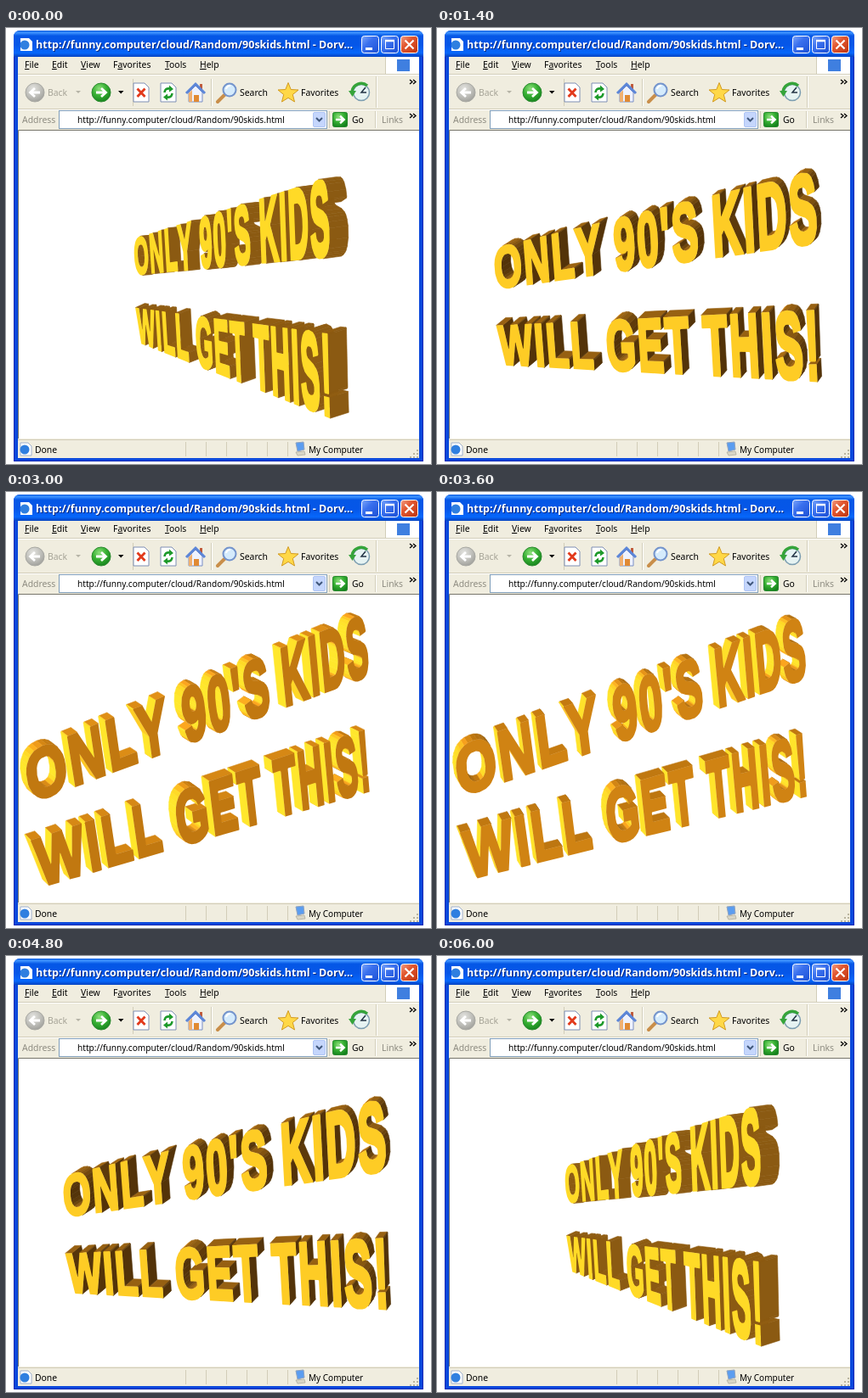
An HTML page that plays this animation: 500 px wide and 514 px high, repeating every 6200 ms.

```html
<!DOCTYPE html>
<html lang="en">
<head>
<meta charset="utf-8">
<title>Only 90's kids</title>
<style>
html, body { margin: 0; width: 100%; height: 100%; overflow: hidden; background: #fff; }
svg { display: block; width: 500px; height: 514px; }
text { font: 10.4px "Noto Sans", "Open Sans", sans-serif; fill: #000; white-space: pre; }
.u { text-decoration: underline; }
.dim { fill: #a5a396; }
.line { fill: none; stroke: #d2cdb8; }
</style>
</head>
<body>
<svg viewBox="0 0 500 514">
  <defs>
    <linearGradient id="bar" x2="0" y2="1">
      <stop offset="0" stop-color="#0a5be0"/><stop offset=".08" stop-color="#3c92ff"/>
      <stop offset=".2" stop-color="#0557e6"/><stop offset=".55" stop-color="#0556e8"/>
      <stop offset=".85" stop-color="#0667fb"/><stop offset="1" stop-color="#0342c0"/>
    </linearGradient>
    <linearGradient id="blue" x2="1" y2="1">
      <stop offset="0" stop-color="#7fa8fa"/><stop offset=".4" stop-color="#3a70ee"/><stop offset="1" stop-color="#1c50d4"/>
    </linearGradient>
    <linearGradient id="red" x2="1" y2="1">
      <stop offset="0" stop-color="#f4a088"/><stop offset=".4" stop-color="#e2572f"/><stop offset="1" stop-color="#bf3410"/>
    </linearGradient>
    <radialGradient id="green" cx=".4" cy=".3" r=".75">
      <stop offset="0" stop-color="#8ee07c"/><stop offset=".5" stop-color="#37b033"/><stop offset="1" stop-color="#14801c"/>
    </radialGradient>
    <radialGradient id="gray" cx=".4" cy=".3" r=".75">
      <stop offset="0" stop-color="#e4e4e0"/><stop offset=".6" stop-color="#bdbdb8"/><stop offset="1" stop-color="#9d9d98"/>
    </radialGradient>
    <path id="page" d="M-9-11H4L9-6V11H-9Z" fill="#fff" stroke="#7f8fb4"/>
    <path id="more" d="M0 0l3 2.5-3 2.5M4 0l3 2.5-3 2.5" fill="none" stroke="#000" stroke-width="1.3"/>
    <path id="arrow" d="M-6 0H5M0-5L5.5 0 0 5" fill="none" stroke="#fff" stroke-width="2.8"/>
  </defs>

  <!-- window frame -->
  <path d="M9 511V11Q9 3 17 3H483Q491 3 491 11V511Z" fill="#0a48dc"/>
  <path d="M9.5 510.5V34M490.5 34V510.5H9.5" fill="none" stroke="#0526b4"/>
  <path d="M9 34V11Q9 3 17 3H483Q491 3 491 11V34Z" fill="url(#bar)"/>
  <path d="M17 12H27L31 16V27H17Z" fill="#fff"/>
  <circle cx="22" cy="20" r="5.5" fill="#2f7fe0"/>
  <text x="36" y="25" style="font-size:12.5px;font-weight:700;fill:#0a2a80">http://funny.computer/cloud/Random/90skids.html - Dorv...</text>
  <text x="35" y="24" style="font-size:12.5px;font-weight:700;fill:#fff">http://funny.computer/cloud/Random/90skids.html - Dorv...</text>
  <g stroke="#fff">
    <rect x="418.5" y="9.5" width="20" height="20" rx="3" fill="url(#blue)"/>
    <rect x="441.5" y="9.5" width="20" height="20" rx="3" fill="url(#blue)"/>
    <rect x="464.5" y="9.5" width="20" height="20" rx="3" fill="url(#red)"/>
    <path d="M423 24.5H431" stroke-width="3"/>
    <path d="M446.5 15V24.5H456.5V15" fill="none"/>
    <path d="M446 15H457" stroke-width="2.5"/>
    <path d="M469.5 14.5L479.5 24.5M479.5 14.5L469.5 24.5" stroke-width="2.2"/>
  </g>

  <!-- menu, toolbar and address bar -->
  <rect x="14" y="34" width="472" height="473" fill="#f0eddf"/>
  <rect x="447" y="34" width="39" height="20" fill="#fff"/>
  <rect x="460" y="37" width="15" height="14" fill="#3f7fe0"/>
  <path class="line" d="M14 54.5H486M14 95.5H486M446.5 34V54M149.5 60V92M241.5 60V92M435.5 57V94M380.5 98V118M434.5 98V118"/>
  <path d="M14 55.5H486M14 96.5H486M242.5 60V92M436.5 57V94M435.5 98V118" fill="none" stroke="#fff"/>
  <text x="22" y="47"><tspan class="u">F</tspan>ile</text>
  <text x="54" y="47"><tspan class="u">E</tspan>dit</text>
  <text x="88" y="47"><tspan class="u">V</tspan>iew</text>
  <text x="126" y="47">F<tspan class="u">a</tspan>vorites</text>
  <text x="187" y="47"><tspan class="u">T</tspan>ools</text>
  <text x="228" y="47"><tspan class="u">H</tspan>elp</text>

  <circle cx="34" cy="76" r="11" fill="url(#gray)" stroke="#a8a8a2"/>
  <use href="#arrow" transform="translate(34 76) scale(-1 1)"/>
  <text x="49" y="80" class="dim">Back</text>
  <path d="M82 74H88L85 77Z" fill="#b5b3a6"/>
  <circle cx="112" cy="76" r="11" fill="url(#green)" stroke="#2c8a30"/>
  <use href="#arrow" x="112" y="76"/>
  <path d="M132 74H138.5L135.2 77.5Z"/>
  <use href="#page" x="159" y="76"/>
  <path d="M154.5 71.5L163.5 81M163.5 71.5L154.5 81" stroke="#e23a1c" stroke-width="2.8"/>
  <use href="#page" x="191" y="76"/>
  <path d="M186.5 76Q187 70.5 193 71.5M195.5 77Q195 82.5 189 81.5" fill="none" stroke="#1d9a2b" stroke-width="2.6"/>
  <path d="M192 67.5L197 72 192 75.5ZM190 77.5L185 81.5 190 85.5Z" fill="#1d9a2b"/>
  <path d="M215 76L223 68 231 76V87H215Z" fill="#eef2ff" stroke="#7a8fc4"/>
  <path d="M215 77L219 73V87H215Z" fill="#f0b070"/>
  <path d="M228 66H231V73H228Z" fill="#c05a3a"/>
  <path d="M212 77L223 66 234 77" fill="none" stroke="#5c86d8" stroke-width="3"/>
  <path d="M221 79H227V87H221Z" fill="#e08a34"/>
  <path d="M257 79L249 87" stroke="#c98e4a" stroke-width="4" stroke-linecap="round"/>
  <circle cx="263" cy="73" r="7.5" fill="#d5ebfc" stroke="#7494cc" stroke-width="2"/>
  <path d="M259 72Q260 68 264 68" fill="none" stroke="#fff" stroke-width="2"/>
  <text x="275" y="80">Search</text>
  <path d="M332 64.5L335.2 72.5 344 73 337.3 78.5 339.5 87 332 82.3 324.5 87 326.7 78.5 320 73 328.8 72.5Z" fill="#ffd847" stroke="#d29a20"/>
  <text x="347" y="80">Favorites</text>
  <circle cx="418" cy="76" r="9.5" fill="#e6f3f2" stroke="#7b9db0" stroke-width="1.5"/>
  <path d="M407 75A11 11 0 0 1 425 68" fill="none" stroke="#35a43a" stroke-width="3.5"/>
  <path d="M403 74H412L407.5 81Z" fill="#35a43a"/>
  <path d="M423 70L418 76H424" fill="none" stroke="#234" stroke-width="1.5"/>
  <use href="#more" x="475" y="61"/>

  <text x="19" y="112" class="dim" style="fill:#8d8b80">Address</text>
  <rect x="62.5" y="97.5" width="315" height="21" fill="#fff" stroke="#7f9db9"/>
  <text x="84" y="112" style="font-size:10.15px">http://funny.computer/cloud/Random/90skids.html</text>
  <rect x="361.5" y="99.5" width="14" height="17" rx="1.5" fill="#c5d6fc" stroke="#aec4f4"/>
  <path d="M365 106L368.5 109.5 372 106" fill="none" stroke="#41587c" stroke-width="2"/>
  <rect x="384.5" y="99.5" width="17" height="17" rx="2" fill="url(#green)" stroke="#258a2c"/>
  <use href="#arrow" transform="translate(393 108) scale(.85)"/>
  <text x="407" y="112">Go</text>
  <text x="442" y="112" style="fill:#8d8b80">Links</text>
  <use href="#more" x="475" y="101"/>

  <!-- page area and status bar -->
  <rect x="14" y="120" width="472" height="364" fill="#fff"/>
  <path d="M14.5 484V120.5H486" fill="none" stroke="#77756a"/>
  <path class="line" d="M14 485.5H486M211.5 488V505M235.5 488V505M259.5 488V505M283.5 488V505M307.5 488V505M331.5 488V505"/>
  <path d="M17 489H26L30 493V504H17Z" fill="#fff" stroke="#9fb0cc"/>
  <circle cx="22" cy="497" r="5.5" fill="#2f7fe0"/>
  <text x="34" y="501">Done</text>
  <path d="M341 489L350 488 351 497 343 499Z" fill="#5b9df0" stroke="#8fa3c0"/>
  <path d="M341 500L351 499 352 503 343 504Z" fill="#d9d6c6" stroke="#a8a698" stroke-width=".7"/>
  <text x="356" y="501" style="font-size:10px">My Computer</text>
  <path d="M483 497h2v2h-2zM479 501h2v2h-2zM483 501h2v2h-2zM475 505h2v2h-2zM479 505h2v2h-2zM483 505h2v2h-2z" fill="#bab59f"/>
  <g id="words"></g>
</svg>
<script>
const EM = 100, BOLD = 5, PAD = 20, BASE = 100;
const CAP = EM * 0.688 + BOLD, TOP = BASE - EM * 0.688 - BOLD / 2;
const cv = document.createElement('canvas');
cv.width = 160; cv.height = 130;
const pen = cv.getContext('2d', { willReadFrequently: true });

// Reduce a run of points to its corners.
function thin(pts, tol) {
  const a = pts[0], b = pts[pts.length - 1];
  const dx = b[0] - a[0], dy = b[1] - a[1], len = Math.hypot(dx, dy) || 1;
  let far = 0, at = 0;
  pts.forEach((q, i) => {
    const d = Math.abs((q[0] - a[0]) * dy - (q[1] - a[1]) * dx) / len;
    if (d > far) { far = d; at = i; }
  });
  if (far <= tol) return [a, b];
  return thin(pts.slice(0, at + 1), tol).slice(0, -1).concat(thin(pts.slice(at), tol));
}

function thinLoop(loop) {
  const dist = q => Math.hypot(q[0] - loop[0][0], q[1] - loop[0][1]);
  let m = 0;
  loop.forEach((q, i) => { if (dist(q) > dist(loop[m])) m = i; });
  const first = thin(loop.slice(0, m + 1), 0.5);
  const second = thin(loop.slice(m).concat([loop[0]]), 0.5);
  return first.slice(0, -1).concat(second.slice(0, -1));
}

// Outline loops of one letter, the inside always on the right hand.
function outline(ch) {
  const w = cv.width, h = cv.height;
  pen.clearRect(0, 0, w, h);
  pen.font = `bold ${EM}px "Liberation Sans", Arial, sans-serif`;
  pen.lineWidth = BOLD;
  pen.lineJoin = 'miter';
  pen.miterLimit = 4;
  pen.fillText(ch, PAD, BASE);
  pen.strokeText(ch, PAD, BASE);
  const px = pen.getImageData(0, 0, w, h).data;
  const ink = ([x, y]) => px[(y * w + x) * 4 + 3];
  const next = new Map();
  for (let y = 0; y < h - 1; y++) for (let x = 0; x < w - 1; x++) {
    const c = [[x, y], [x + 1, y], [x + 1, y + 1], [x, y + 1]];
    const v = c.map(ink), on = v.map(a => a > 127);
    const key = [`h${x},${y}`, `v${x + 1},${y}`, `h${x},${y + 1}`, `v${x},${y}`];
    for (let i = 0; i < 4; i++) {
      const j = (i + 1) % 4;
      if (!on[i] || on[j]) continue;
      let e = j;
      while (on[e] || !on[(e + 1) % 4]) e = (e + 1) % 4;
      const f = (127.5 - v[i]) / (v[j] - v[i]);
      next.set(key[i], {
        pt: [c[i][0] + f * (c[j][0] - c[i][0]), c[i][1] + f * (c[j][1] - c[i][1])],
        to: key[e]
      });
    }
  }
  const loops = [];
  while (next.size) {
    let k = next.keys().next().value;
    const loop = [];
    while (next.has(k)) {
      const n = next.get(k);
      next.delete(k);
      loop.push(n.pt);
      k = n.to;
    }
    if (loop.length > 8) loops.push(thinLoop(loop));
  }
  return { loops, adv: pen.measureText(ch).width };
}

// A line of letters scaled to the unit square.
function setLine(str) {
  let x = 0, lo = 1e9, hi = -1e9;
  const letters = [];
  for (const ch of str) {
    if (ch === ' ') { x += 30; continue; }
    const g = outline(ch);
    const loops = g.loops.map(l => l.map(([a, b]) => [a + x, (b - TOP) / CAP]));
    loops.flat().forEach(q => { lo = Math.min(lo, q[0]); hi = Math.max(hi, q[0]); });
    letters.push(loops);
    x += g.adv + 5;
  }
  return letters.map(ls => ls.map(l => l.map(([a, b]) => [(a - lo) / (hi - lo), b])));
}

const lines = [setLine("ONLY 90'S KIDS"), setLine('WILL GET THIS!')];

// pose, left, right, line 1 (left top, left bottom, right top, right bottom), line 2 (same),
// depth ratio, lean left, lean right, extrusion left x y, right x y, extra y for line 2
const SHAPE = [
  [0, 151, 380, 249, 292, 177, 271, 330, 371, 361, 461, .78, 3, 3, 11, -1, 22, -3, -4],
  [4, 105, 421, 254, 298, 174, 264, 339, 384, 350, 441, .85, 3, 3, 11, -3, 14, -3, -3],
  [6, 68, 446, 260, 309, 169, 255, 351, 398, 333, 418, .91, 4, 4, 11, -7, 5, -5, -2],
  [9, 26, 450, 283, 338, 156, 234, 376, 431, 304, 383, 1.14, 6, 5, 6, -8, -2, -5, -1],
  [10, 22, 445, 291, 348, 152, 227, 386, 442, 294, 371, 1.2, 7, 5, 2, -8, -5, -5, -1],
  [14, 25, 425, 310, 368, 144, 218, 411, 468, 281, 354, 1.3, 10, 6, -7, -6, -10, -4, -1]
];
// pose, then light on face, left, right and top
const LIGHT = [
  [0, .88, 1, .3, .32],
  [4, .84, 1, .1, .34],
  [6, .81, .92, .04, .34],
  [9, .66, .92, .06, .31],
  [10, .61, .93, .1, .35],
  [14, .49, 1, .3, .5]
];
const RAMP = [
  [0, 74, 45, 8], [.3, 139, 90, 18], [.5, 196, 122, 16],
  [.65, 252, 165, 31], [.85, 255, 214, 38], [1, 255, 232, 44]
];

const mix = (a, b, f) => a + (b - a) * f;

function tone(b) {
  let i = 0;
  while (i < RAMP.length - 2 && b > RAMP[i + 1][0]) i++;
  const p = RAMP[i], q = RAMP[i + 1], f = (b - p[0]) / (q[0] - p[0]);
  return `rgb(${[1, 2, 3].map(c => Math.round(mix(p[c], q[c], f)))})`;
}

// Smooth curve through the rows, at rest at both ends.
function sample(rows, p) {
  let i = 0;
  while (i < rows.length - 2 && p >= rows[i + 1][0]) i++;
  const a = rows[i], b = rows[i + 1], h = b[0] - a[0], f = (p - a[0]) / h;
  const slope = (n, c) => n === 0 || n === rows.length - 1 ? 0
    : (rows[n + 1][c] - rows[n - 1][c]) / (rows[n + 1][0] - rows[n - 1][0]);
  const f2 = f * f, f3 = f2 * f, s = 3 * f2 - 2 * f3;
  return a.slice(1).map((v, n) => mix(v, b[n + 1], s)
    + h * ((f3 - 2 * f2 + f) * slope(i, n + 1) + (f3 - f2) * slope(i + 1, n + 1)));
}

const fix = q => q[0].toFixed(1) + ' ' + q[1].toFixed(1);

function drawLine(letters, row, shape, light) {
  const [left, right] = shape;
  const [tl, bl, tr, br] = shape.slice(2 + row * 4, 6 + row * 4);
  const [k, leanL, leanR, exL, eyL, exR, eyR, extra] = shape.slice(10);
  const [face, sideL, sideR, top] = light;
  const x0 = left + row * leanL * 0.9;
  const place = ([s, v]) => {
    const u = s * k / (s * k + 1 - s);
    return {
      at: [mix(x0, right, u) + mix(leanL, leanR, u) * (v - 0.5), mix(mix(tl, tr, u), mix(bl, br, u), v)],
      off: [mix(exL, exR, u), mix(eyL, eyR, u) + row * extra]
    };
  };
  const sides = [];
  let faces = '';
  const dir = [(exL + exR) / 2, (eyL + eyR) / 2 + row * extra];
  for (const loops of letters) {
    let d = '';
    for (const loop of loops) {
      const pts = loop.map(place);
      d += 'M' + pts.map(q => fix(q.at)).join('L') + 'Z';
      pts.forEach((a, i) => {
        const b = pts[(i + 1) % pts.length];
        const ex = b.at[0] - a.at[0], ey = b.at[1] - a.at[1], len = Math.hypot(ex, ey) || 1;
        if (ey * (a.off[0] + b.off[0]) - ex * (a.off[1] + b.off[1]) <= 0) return;
        const nx = ey / len, ny = -ex / len;
        const lit = nx * nx * (nx > 0 ? sideR : sideL) + ny * ny * (ny < 0 ? top : sideR);
        const back = q => [q.at[0] + q.off[0], q.at[1] + q.off[1]];
        const c = tone(lit);
        sides.push({
          order: (a.at[0] + b.at[0]) * dir[0] + (a.at[1] + b.at[1]) * dir[1],
          svg: `<path d="M${[a.at, b.at, back(b), back(a)].map(fix).join('L')}Z" fill="${c}" stroke="${c}" stroke-width=".6" stroke-linejoin="round"/>`
        });
      });
    }
    faces += `<path d="${d}" fill="${tone(face)}" fill-rule="evenodd"/>`;
  }
  sides.sort((a, b) => a.order - b.order);
  return sides.map(s => s.svg).join('') + faces;
}

const words = document.getElementById('words');
const STEP = 200, LOOP = 6200, start = performance.now();
let shown = -1;

function show(t) {
  const tick = Math.floor(t % LOOP / STEP);
  const pose = Math.max(0, Math.min(tick - 1, 30 - tick));
  if (pose === shown) return;
  shown = pose;
  const shape = sample(SHAPE, pose), light = sample(LIGHT, pose);
  words.innerHTML = lines.map((l, row) => drawLine(l, row, shape, light)).join('');
}

function loop() {
  show(performance.now() - start);
  requestAnimationFrame(loop);
}
loop();
</script>
</body>
</html>
```
